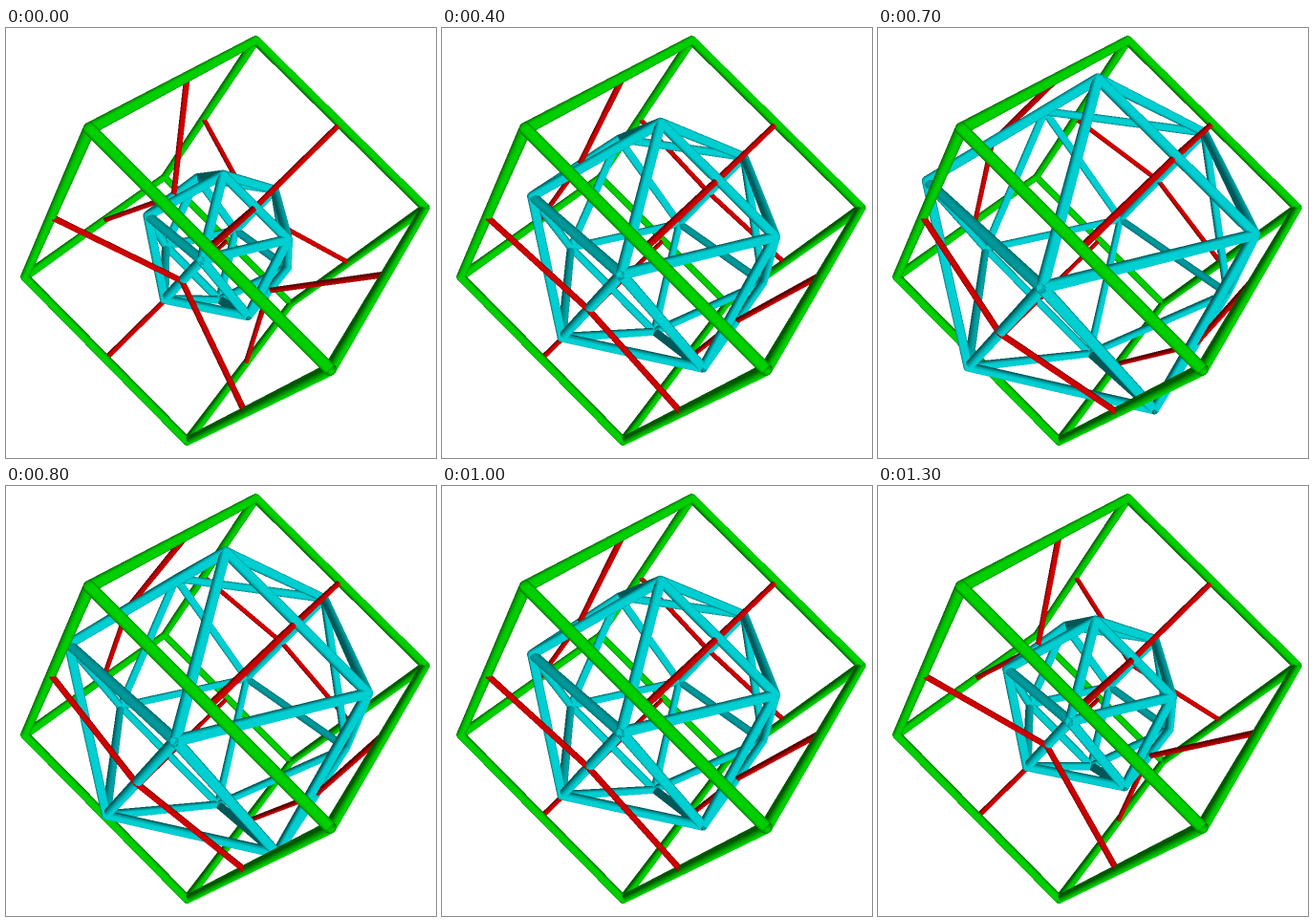
Recreate the animation shown at these times as an HTML page with a canvas. Size 450 by 450 pixels, loop 1400 ms.

```html
<!DOCTYPE html>
<html lang="en">
<head>
<meta charset="utf-8">
<title>Icosahedron growing through a cube</title>
<style>
  html, body { margin: 0; height: 100%; overflow: hidden; background: #fff; }
  canvas { display: block; width: 450px; height: 450px; }
</style>
</head>
<body>
<canvas id="stage" width="450" height="450"></canvas>
<script>
const SIZE = 900;                 // drawn at double size, then scaled down
const EYE = 4.557, FOCAL = 1119;
const TILT = 0.051, TURN = 0.02, H = Math.SQRT1_2;
const PHI = (1 + Math.sqrt(5)) / 2;
const STEPS = 14, STEP_MS = 100;
const GREEN = [0, 207, 0], CYAN = [0, 207, 210], RED = [207, 0, 0];

const dot = (a, b) => a[0] * b[0] + a[1] * b[1] + a[2] * b[2];
const sub = (a, b) => a.map((v, i) => v - b[i]);
const unit = a => a.map(v => v / Math.sqrt(dot(a, a)));
const cross = (a, b) => [0, 1, 2].map(i =>
  a[(i + 1) % 3] * b[(i + 2) % 3] - a[(i + 2) % 3] * b[(i + 1) % 3]);
const LIGHT = unit([0.4, 0.3, 0.87]);

// Model axes to camera space: x right, y down, z towards the eye
function toCamera([a, b, c]) {
  const v0 = H * (b - c), z0 = -H * (b + c);
  const v = v0 - TILT * z0, z1 = z0 + TILT * v0;
  const u = a - TURN * z1, z = z1 + TURN * a;
  return [H * (u + v), H * (u - v), z];
}

function project([x, y, z]) {
  const w = 1 / (EYE - z);
  return [SIZE / 2 + x * FOCAL * w, SIZE / 2 + y * FOCAL * w, w];
}

const big = document.createElement('canvas');
big.width = big.height = SIZE;
const pen = big.getContext('2d');
const image = pen.createImageData(SIZE, SIZE);
const depth = new Float32Array(SIZE * SIZE);

// Shaded round tube with depth test
function tube(from, to, r, color) {
  const p = toCamera(from), q = toCamera(to);
  const [ax, ay, aw] = project(p), [bx, by, bw] = project(q);
  const dx = bx - ax, dy = by - ay, len2 = dx * dx + dy * dy, len = Math.sqrt(len2);
  const pad = r * FOCAL * Math.max(aw, bw) + 1;

  const axis = unit(sub(q, p));
  const view = unit(sub([0, 0, EYE], p.map((v, i) => (v + q[i]) / 2)));
  const side = unit(cross(axis, view)), front = cross(side, axis);
  const sideLight = -dot(side, LIGHT), frontLight = dot(front, LIGHT);

  const x0 = Math.floor(Math.min(ax, bx) - pad), x1 = Math.max(ax, bx) + pad;
  const y0 = Math.floor(Math.min(ay, by) - pad), y1 = Math.max(ay, by) + pad;
  for (let y = y0; y <= y1; y++) {
    for (let x = x0; x <= x1; x++) {
      const px = x + 0.5 - ax, py = y + 0.5 - ay;
      const off = (dx * py - dy * px) / len;
      if (off > pad || off < -pad) continue;
      const t = Math.min(1, Math.max(0, (px * dx + py * dy) / len2));
      const w = aw + t * (bw - aw), radius = r * FOCAL * w;
      const ex = px - t * dx, ey = py - t * dy;
      const d2 = (ex * ex + ey * ey) / (radius * radius);
      if (d2 >= 1) continue;
      const h = Math.sqrt(1 - d2), z = EYE - 1 / w + r * h, i = y * SIZE + x;
      if (z <= depth[i]) continue;
      depth[i] = z;
      const lit = Math.max(0, off / radius * sideLight + h * frontLight);
      const shade = Math.min(1, 0.42 + 0.8 * lit);
      for (let c = 0; c < 3; c++) image.data[i * 4 + c] = color[c] * shade;
    }
  }
}

// Point with the given values on axis i and on axis j
function point(i, a, j, b) {
  const p = [0, 0, 0];
  p[i] = a;
  p[j] = b;
  return p;
}

// Joins all pairs of points that lie one edge length apart
function solid(points, edge, r, color) {
  points.forEach((p, i) => points.slice(i + 1).forEach(q => {
    const d = sub(p, q);
    if (Math.abs(Math.sqrt(dot(d, d)) - edge) < 0.01) tube(p, q, r, color);
  }));
}

const signs = [-1, 1];
const cube = signs.flatMap(a => signs.flatMap(b => signs.map(c => [a, b, c])));

function render(step) {
  image.data.fill(255);
  depth.fill(-99);
  const m = 1.221 - 0.0927 * Math.abs(7 - step), k = m / PHI;
  const ico = [];
  for (let i = 0; i < 3; i++) {
    const next = (i + 1) % 3, last = (i + 2) % 3;
    for (const s of signs) for (const t of signs) {
      ico.push(point(i, s * m, next, t * k));
      tube(point(i, s * m, last, 0), point(i, s, last, t), 0.023, RED);
    }
  }
  solid(cube, 2, 0.038, GREEN);
  solid(ico, 2 * k, 0.038, CYAN);

  pen.putImageData(image, 0, 0);
  const out = document.createElement('canvas');
  out.width = out.height = SIZE / 2;
  out.getContext('2d').drawImage(big, 0, 0, SIZE / 2, SIZE / 2);
  return out;
}

const ctx = document.getElementById('stage').getContext('2d');
const cache = [];
let shown = -1;

function frame() {
  const step = Math.floor(performance.now() / STEP_MS) % STEPS;
  if (step !== shown) {
    cache[step] = cache[step] || render(step);
    ctx.drawImage(cache[step], 0, 0);
    shown = step;
  }
  requestAnimationFrame(frame);
}
frame();
</script>
</body>
</html>
```
